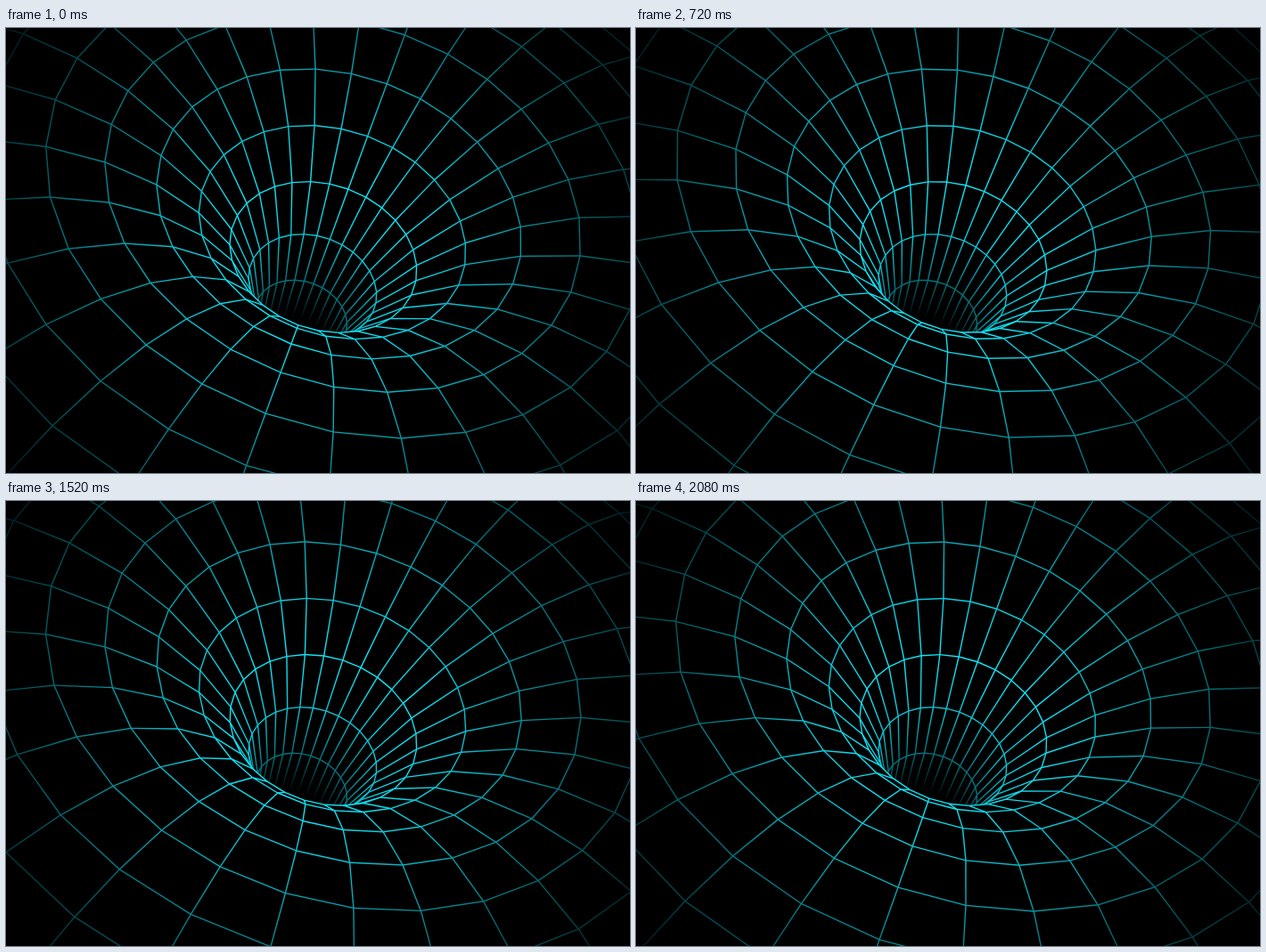
An HTML page with a canvas for the animation above (2160 ms loop, 700 by 500 pixels).

```html
<!DOCTYPE html>
<html>
<head>
<meta charset="utf-8">
<title>Wireframe funnel</title>
<style>
html, body { margin: 0; width: 100%; height: 100%; overflow: hidden; background: #000; }
canvas { display: block; }
</style>
</head>
<body>
<canvas id="stage" width="700" height="500"></canvas>
<script>
const ctx = document.getElementById('stage').getContext('2d');
const { sin, cos, min, max, hypot, PI } = Math;
const LOOP = 2160, STEP = 80;
const SIDES = 30, SECTOR = 2 * PI / SIDES, PHASE = 5.6 * PI / 180;

// The funnel is the inner, upper part of a torus seen by a rolled camera
const CORE = 370.5, TUBE = 321, RINGS = 12;
const DISTANCE = 2310, TILT = 49 * PI / 180, ROLL = 19.8 * PI / 180;
const OFFSET_X = 8.3, OFFSET_Y = 56;

function vertex(ring, angle) {
  const tube = ring * SECTOR;
  const r = CORE - TUBE * cos(tube);
  const height = TUBE * (sin(tube) - sin(PI / 3));
  const back = r * sin(angle);
  const scale = DISTANCE / (DISTANCE - height * sin(TILT) + back * cos(TILT));
  const u = scale * (OFFSET_X + r * cos(angle));
  const v = scale * (OFFSET_Y + height * cos(TILT) + back * sin(TILT));
  const dx = u * cos(ROLL) + v * sin(ROLL);
  const dy = u * sin(ROLL) - v * cos(ROLL);
  return { x: 350 + dx, y: 250 + dy, color: shade(ring, hypot(dx, dy)) };
}

// Darker down the throat and towards the edges of the stage
function shade(ring, radius) {
  const throat = sin(min(ring / 3, 1) * PI / 2);
  const vignette = max(0, min(1, 1 - (radius - 100) / 370));
  const level = throat * vignette;
  return `rgb(${18 * level * level},${228 * level},${246 * level})`;
}

function edge(p, q) {
  const fade = ctx.createLinearGradient(p.x, p.y, q.x, q.y);
  fade.addColorStop(0, p.color);
  fade.addColorStop(1, q.color);
  ctx.strokeStyle = fade;
  ctx.beginPath();
  ctx.moveTo(p.x, p.y);
  ctx.lineTo(q.x, q.y);
  ctx.stroke();
}

function trace(points) {
  points.forEach((p, i) => i ? ctx.lineTo(p.x, p.y) : ctx.moveTo(p.x, p.y));
  ctx.closePath();
}

function draw(t) {
  const turn = PHASE - SECTOR * t / LOOP;
  const rings = Array.from({ length: RINGS }, (_, k) =>
    Array.from({ length: SIDES }, (_, i) => vertex(k, turn + i * SECTOR)));
  ctx.fillStyle = '#000';
  ctx.fillRect(0, 0, 700, 500);
  ctx.lineWidth = 1.4;
  for (let k = 0; k < RINGS - 1; k++) {
    const inner = rings[k], outer = rings[k + 1];
    // The front lip hides the near wall of the throat
    if (k >= 3) {
      ctx.beginPath();
      trace(inner);
      trace(outer);
      ctx.fill('evenodd');
    }
    inner.forEach((p, i) => {
      edge(p, outer[i]);
      edge(p, inner[(i + 1) % SIDES]);
    });
  }
}

const start = performance.now();
function tick() {
  const t = (performance.now() - start) % LOOP;
  draw(Math.floor(t / STEP) * STEP);
  requestAnimationFrame(tick);
}
tick();
</script>
</body>
</html>
```
